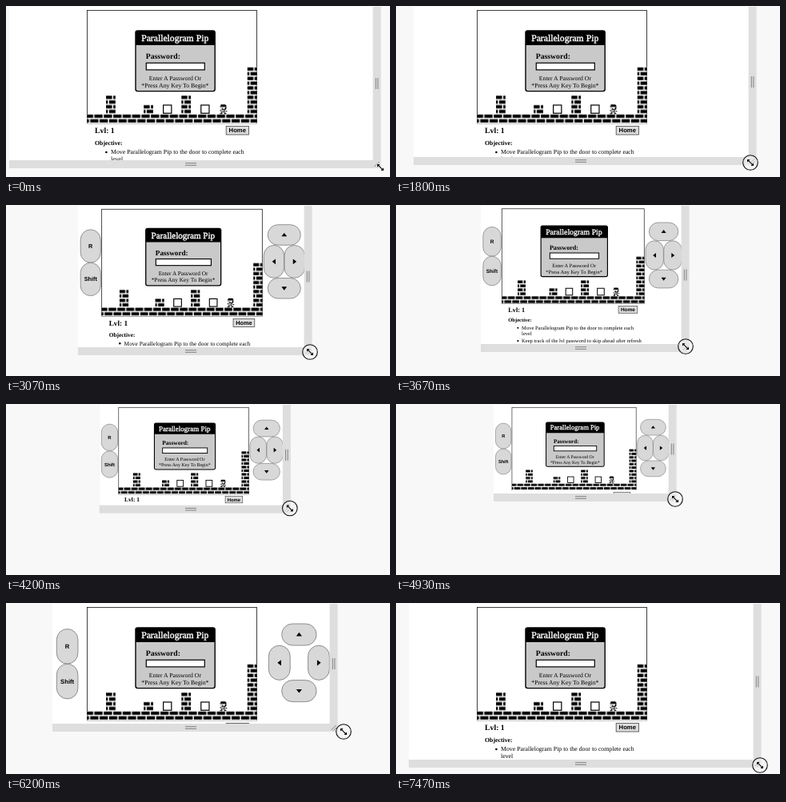
An HTML page for the animation above (7540 ms loop, 480 px wide and 214 px high).

```html
<!DOCTYPE html>
<html lang="en">
<head>
<meta charset="utf-8">
<title>Responsive game page</title>
<style>
  html, body { margin: 0; width: 100%; height: 100%; overflow: hidden; background: #f8f8f8; }
  svg { display: block; width: 100%; height: 100%; text-rendering: geometricPrecision; }
  .serif { font-family: "Liberation Serif", serif; }
  .sans { font-family: "Liberation Sans", sans-serif; font-weight: bold; font-size: 7.7px; }
  .bold { font-weight: bold; }
  .mid { text-anchor: middle; }
  .key { fill: #d8d8d8; stroke: #777; stroke-width: .8; }
  .grip { stroke: #808080; stroke-width: 1; fill: none; }
</style>
</head>
<body>
<svg viewBox="0 0 480 214">
  <defs>
    <clipPath id="clip"><rect id="clipBox" y="1"/></clipPath>
    <pattern id="brick" patternUnits="userSpaceOnUse" x="101.5" y="5.5" width="11.78" height="11.8">
      <rect width="11.78" height="11.8" fill="#fff"/>
      <path d="M0 .5h7.5v4.2H0zM9 .5h2.8v4.2H9zM0 6.4h2.3v4.2H0zM3.8 6.4h8v4.2h-8z"/>
    </pattern>
  </defs>
  <rect width="480" height="214" fill="#f8f8f8"/>
  <rect id="frame" y="1" fill="#dedede"/>
  <rect id="page" y="1" fill="#fff"/>
  <path id="gripRight" class="grip" d="M-1.3-7V7M1.3-7V7"/>
  <path id="gripBottom" class="grip" d="M-7-1.3H7M-7 1.3H7"/>
  <path id="gripCorner" class="grip" d="M-3 3L3-3M0 3.5L3.5 0"/>

  <g clip-path="url(#clip)">
    <g id="content">
      <g id="level">
        <rect x="101.5" y="5.5" width="212" height="141.3" fill="#fff" stroke="#111" stroke-width=".8"/>
      </g>
      <g id="dialog" class="serif">
        <rect x="162" y="31" width="99.2" height="75.6" rx="2.5" fill="#c9c9c9" stroke="#000" stroke-width="1.4"/>
        <path d="M162 49V33.2q0-2.2 2.2-2.2h94.8q2.2 0 2.2 2.2V49z"/>
        <text class="mid" x="211.2" y="43.9" font-size="11.7" fill="#fff" stroke="#fff" stroke-width=".4">Parallelogram Pip</text>
        <text class="bold" x="174.8" y="66.3" font-size="9.7">Password:</text>
        <rect x="175.3" y="71.3" width="73" height="8.6" fill="#fff" stroke="#000" stroke-width="1.2"/>
        <g class="mid" font-size="7.75">
          <text x="211.4" y="92.6">Enter A Password Or</text>
          <text x="211.4" y="101.8">*Press Any Key To Begin*</text>
        </g>
      </g>
      <g class="serif" font-size="7.8">
        <text class="bold" x="111" y="159.2" font-size="9.8">Lvl: 1</text>
        <text class="bold" x="111" y="173.8">Objective:</text>
        <circle cx="125.4" cy="183" r="1.3"/>
        <text x="131" y="185.4">Move Parallelogram Pip to the door to complete each</text>
        <text x="131" y="194">level</text>
        <circle cx="125.4" cy="202.4" r="1.3"/>
        <text x="131" y="204.8">Keep track of the lvl password to skip ahead after refresh</text>
      </g>
      <rect x="275.2" y="150.4" width="28.2" height="10.6" fill="#dedede" stroke="#555" stroke-width=".9"/>
      <text class="sans mid" x="289.3" y="158.4">Home</text>

      <g id="controls">
        <g id="actions">
          <rect class="key" y="32.5" width="26.6" height="43.6" rx="13.3"/>
          <rect class="key" y="76.3" width="26.6" height="43.6" rx="13.3"/>
          <text class="sans mid" x="13.3" y="57">R</text>
          <text class="sans mid" x="13.3" y="100.8">Shift</text>
        </g>
        <g id="padMid">
          <rect class="key" x="-21.7" y="26" width="43.4" height="27" rx="13.5"/>
          <rect class="key" x="-21.7" y="96.6" width="43.4" height="27" rx="13.5"/>
          <path d="M-3.6 41.4L0 36.8L3.6 41.4zM-3.6 108L0 112.6L3.6 108z"/>
        </g>
        <g id="padLeft">
          <rect class="key" y="53.2" width="26.8" height="43.2" rx="13.4"/>
          <path d="M15.6 71.2L11 74.8L15.6 78.4z"/>
        </g>
        <g id="padRight">
          <rect class="key" y="53.2" width="26.8" height="43.2" rx="13.4"/>
          <path d="M11.4 71.2L16 74.8L11.4 78.4z"/>
        </g>
      </g>
    </g>
  </g>

  <g id="cursor">
    <circle id="press" r="9.3" fill="#f2f2f2" fill-opacity=".5" stroke="#111" stroke-width="1.1"/>
    <path d="M-4-4H-.6L-1.7-2.5L2.5 1.7L4 .6V4H.6L1.7 2.5L-2.5-1.7L-4-.6z"
      stroke="#fff" stroke-width=".9" paint-order="stroke"/>
  </g>
</svg>
<script>
const LOOP = 7540, STEP = 200 / 3, TILE = 11.78;
const $ = id => document.getElementById(id);
const set = (id, attrs) => { for (const k in attrs) $(id).setAttribute(k, attrs[k]); };
const move = (id, x, y = 0) => set(id, { transform: `translate(${x} ${y})` });
const clamp = (v, a, b) => Math.min(b, Math.max(a, v));
const mix = (a, b, u) => a + (b - a) * u;

// time, cursor x, cursor y, frame left, frame bottom
const KEYS = [
  [67, 468, 202, 4, 203],
  [267, 467, 200, 4, 203],
  [1200, 467, 200, 4, 203],
  [1800, 443, 196, 22, 199],
  [2000, 425, 191, 39, 195],
  [2800, 389, 184.5, 79, 189],
  [3067, 380, 184, 90, 188],
  [3600, 366, 181, 103, 185.5],
  [3667, 362, 177, 106, 184],
  [4400, 353, 122, 119, 126],
  [4933, 349, 119, 122, 122],
  [5200, 363, 126, 111, 127],
  [6000, 409, 157, 64, 156],
  [6200, 422, 161, 58, 161],
  [6800, 451, 194, 20, 198],
  [7467, 455, 203, 16, 206]
];

const slope = (i, c) => (KEYS[i + 1][c] - KEYS[i][c]) / (KEYS[i + 1][0] - KEYS[i][0]);

// Monotone tangent: harmonic mean of the neighbouring slopes
function tangent(i, c) {
  if (i === 0 || i === KEYS.length - 1) return 0;
  const a = slope(i - 1, c), b = slope(i, c);
  return a * b > 0 ? 2 * a * b / (a + b) : 0;
}

function sample(t, c) {
  const last = KEYS.length - 1;
  if (t <= KEYS[0][0]) return KEYS[0][c];
  if (t >= KEYS[last][0]) return KEYS[last][c];
  const i = KEYS.findIndex(k => k[0] > t) - 1;
  const span = KEYS[i + 1][0] - KEYS[i][0], u = (t - KEYS[i][0]) / span, v = 1 - u;
  return KEYS[i][c] * (1 + 2 * u) * v * v + tangent(i, c) * span * u * v * v
    + KEYS[i + 1][c] * u * u * (3 - 2 * u) - tangent(i + 1, c) * span * u * u * v;
}

function buildLevel() {
  const at = col => 101.5 + col * TILE, ground = 135.3;
  const rect = (x, y, w, h, style) => `<rect x="${x}" y="${y}" width="${w}" height="${h}" ${style}/>`;
  const wall = (col, rows, cols = 1) =>
    rect(at(col), ground - rows * 11.8, cols * TILE, (rows || 1) * 11.8, 'fill="url(#brick)"');
  const crate = col => rect(at(col) + .9, 124, 10.2, 10.2, 'fill="#fff" stroke="#000" stroke-width="1.2"');
  const hero = `<path transform="translate(${at(14)} 123.2)" d="M2 0h6v1h1v3H8V3H1V2h1z
    M2 4h1v1H2zM4 4h1v2H4zM7 4h2v2H7zM3 6h5v1H3zM1 7h2v1H1zM4 8h1v1H4zM6 7h1v2H6zM8 8h2v1H8z
    M2 9h2v1H2zM5 9h2v1H5zM3 10h1v2H1v-1h2zM7 10h1v1h1v1H6v-1h1z"/>`;
  $('level').innerHTML += wall(0, 0, 18) + wall(2, 2) + wall(6, 1) + wall(10, 2) + wall(17, 5)
    + crate(8) + crate(12) + hero;
}

function draw(time) {
  const t = Math.floor((time + 4) / STEP) * STEP;
  const [x, y, left, bottom] = [1, 2, 3, 4].map(c => sample(t, c));
  const right = 472.6 - left, w = right - 10 - left, h = bottom - 11;

  set('frame', { x: left, width: right - left, height: bottom - 1 });
  for (const id of ['page', 'clipBox']) set(id, { x: left, width: w, height: h });
  move('gripRight', right - 5, 1 + h / 2);
  move('gripBottom', 231, bottom - 5);
  move('gripCorner', right - 5, bottom - 5);

  // The game shrinks with the page once it no longer fits
  const s = Math.min(1, w / 298.6), u = clamp((w - 298.6) / 22, 0, 1);
  const gameX = mix(left + .105 * w, 101.5, u);
  set('content', { transform: `translate(${gameX} 1) scale(${s}) translate(-101.5 -1)` });
  move('dialog', -2.3 * (1 - u));

  const gap = Math.max(.5, (w - 314.6) / 3);
  const padX = 315 + gap + 2.7 * u, padW = 54 + 22 * u;
  set('controls', { display: w < 361 ? 'inline' : 'none' });
  move('actions', 74 - gap);
  move('padLeft', padX);
  move('padMid', padX + padW / 2);
  move('padRight', padX + padW - 26.8);

  move('cursor', x, y);
  set('press', { display: t > 460 ? 'inline' : 'none' });
}

buildLevel();
const start = performance.now();
function tick() {
  draw((performance.now() - start) % LOOP);
  requestAnimationFrame(tick);
}
tick();
</script>
</body>
</html>
```
